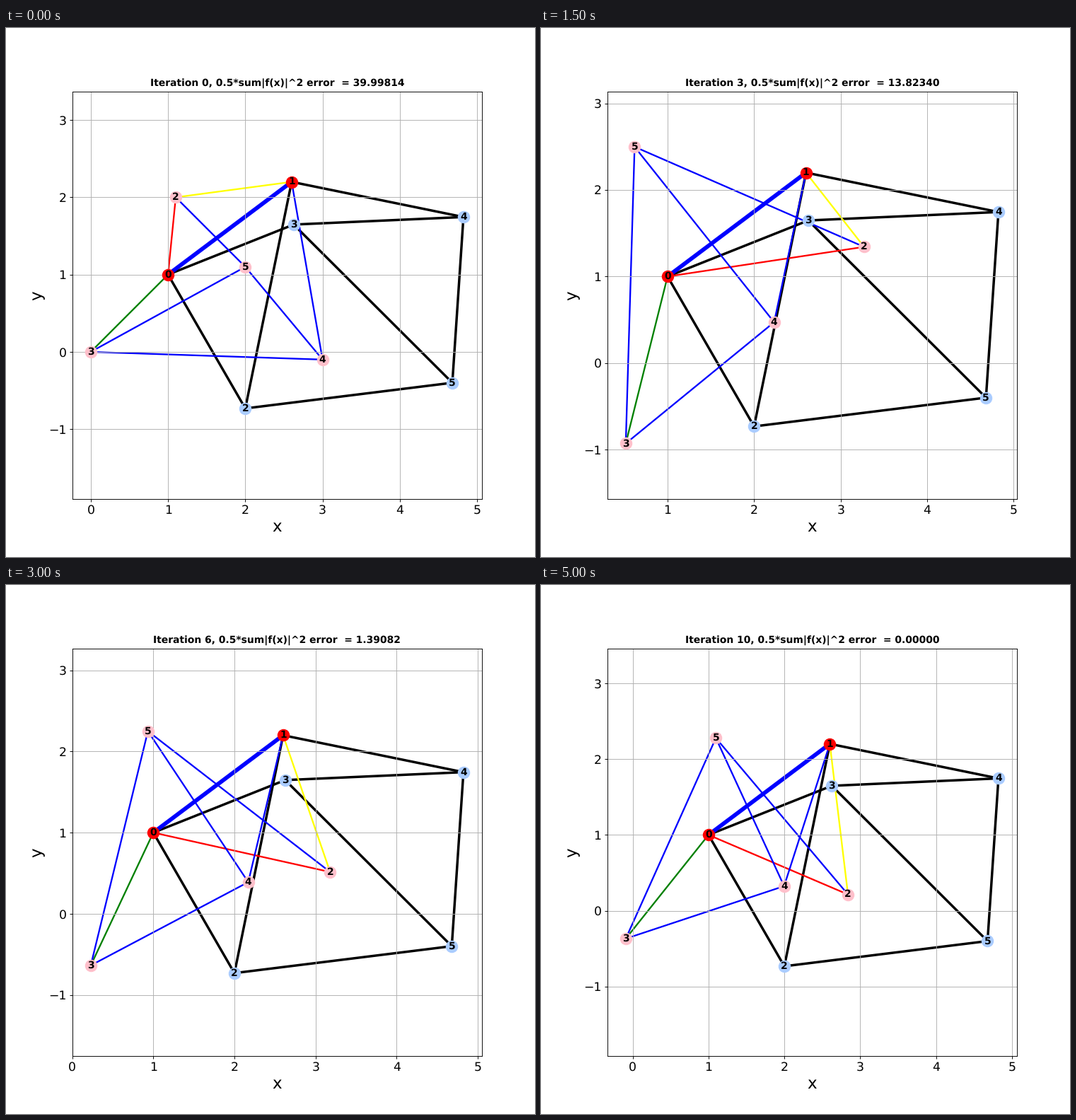
Write a matplotlib script that moves like this. It is 748 by 748 pixels and loops after 5.5 s.

```python
import numpy as np
import matplotlib.pyplot as plt
from matplotlib.animation import FuncAnimation
from matplotlib.collections import LineCollection
from matplotlib.ticker import MultipleLocator

plt.rcParams["font.family"] = "DejaVu Sans"
plt.rcParams["text.hinting"] = "no_hinting"

# Bar linkage: nodes 0 and 1 are pinned, the other four are solved for.
EDGES = [(0, 2), (1, 2), (0, 3), (1, 4), (2, 5), (3, 4), (3, 5), (4, 5)]
LENGTHS = np.array([2, 2, 1.75, 1.97, 2.7, 2.2, 2.9, 2.15])
COLORS = ["red", "yellow", "green"] + ["blue"] * 5
START = np.array([(1, 1), (2.6, 2.2), (1.1, 2), (0, 0), (3, -0.1), (2, 1.1)])
DESIGN = np.array([(1, 1), (3, 1), (2, -0.73), (2.63, 1.65),
                   (4.83, 1.75), (4.68, -0.4)])
DESCENT_STEPS = [1 / 16, 1 / 16, 1 / 32, 1 / 64, 1 / 64]
NEWTON_STEPS = [1 / 2, 1, 1, 1, 1]


def residual(p):
    return np.array([np.sum((p[a] - p[b]) ** 2) for a, b in EDGES]) - LENGTHS ** 2


def jacobian(p):
    jac = np.zeros((len(EDGES), len(p), 2))
    for k, (a, b) in enumerate(EDGES):
        jac[k, a] = 2 * (p[a] - p[b])
        jac[k, b] = -jac[k, a]
    return jac[:, 2:].reshape(len(EDGES), -1)


def moved(p, step):
    q = p.copy()
    q[2:] += step.reshape(-1, 2)
    return q


def descend(p, size):
    return moved(p, -size * jacobian(p).T @ residual(p))


def newton(p, size=1):
    return moved(p, -size * np.linalg.solve(jacobian(p), residual(p)))


def solve():
    path = [START]
    for size in DESCENT_STEPS:
        path.append(descend(path[-1], size))
    for size in NEWTON_STEPS:
        path.append(newton(path[-1], size))
    return path


def reference():
    p = DESIGN
    for _ in range(8):
        p = newton(p)
    p = p.copy()
    p[1] = START[1]
    return p


PATH = solve()
REF = reference()

fig = plt.figure(figsize=(9, 9), dpi=748 / 9, facecolor="white")
ax = fig.add_subplot()


def bars(p, edges, colors, width):
    ax.add_collection(LineCollection([(p[a], p[b]) for a, b in edges], colors=colors,
                                     linewidths=width, zorder=1), autolim=False)


def nodes(p, ids, color):
    ax.scatter(p[ids, 0], p[ids, 1], s=200, c=color, linewidths=1, zorder=2)
    for i in ids:
        ax.text(*p[i], str(i), size=12, weight="bold", ha="center", va="center",
                zorder=3, clip_on=True)


def fit_view(p):
    pts = np.vstack([p, REF])
    lo, hi = pts.min(axis=0), pts.max(axis=0)
    cx, cy = (lo + hi) / 2
    half = 0.55 * (hi[0] - lo[0])
    box = ax.get_position()
    tall = half * box.height / box.width
    ax.set_xlim(cx - half, cx + half)
    ax.set_ylim(cy - tall, cy + tall)


def draw(i):
    p = PATH[i]
    ax.clear()
    bars(REF, EDGES, "black", 3)
    bars(p, EDGES, COLORS, 2)
    bars(p, [(0, 1)], "blue", 5)
    nodes(REF, [2, 3, 4, 5], "#aaccff")
    nodes(p, [2, 3, 4, 5], "pink")
    nodes(p, [0, 1], "red")
    fit_view(p)
    for axis in (ax.xaxis, ax.yaxis):
        axis.set_major_locator(MultipleLocator(1))
    ax.grid(True)
    ax.tick_params(labelsize=15)
    ax.set_xlabel("x", size=20)
    ax.set_ylabel("y", size=20)
    error = 0.5 * np.sum(residual(p) ** 2)
    ax.set_title(f"Iteration {i}, 0.5*sum|f(x)|^2 error  = {error:.5f}",
                 size=12, weight="bold")
    return []


anim = FuncAnimation(fig, draw, frames=len(PATH), init_func=lambda: draw(0),
                     interval=500, repeat=True, repeat_delay=0, blit=False)
plt.show()
```
